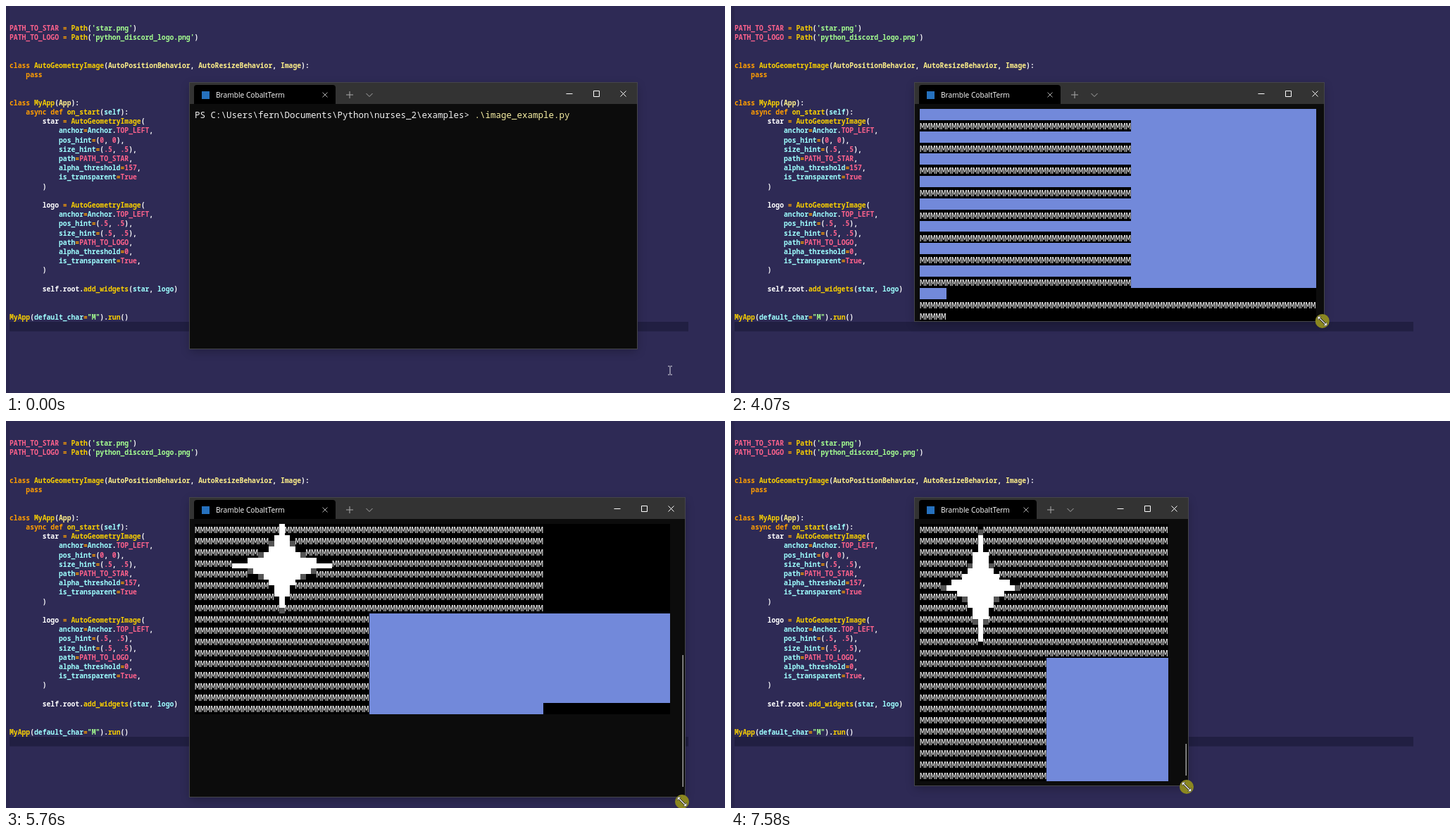
An HTML page that plays this animation: 1021x549 px, repeating every 8000 ms.

```html
<!DOCTYPE html>
<html lang="en">
<head>
<meta charset="utf-8">
<title>Terminal image demo</title>
<style>
  html, body { margin: 0; width: 100%; height: 100%; overflow: hidden; background: #2e2a55; }
  svg { display: block; width: 100vw; height: 100vh; }
  text { white-space: pre; }
  #code { font: 600 9.73px "Noto Sans Mono", monospace; fill: #fff; }
  #term, #prompt { font: 500 12.5px "Noto Sans Mono", monospace; fill: #f2f2f2; }
  #title { font: 10.2px "Open Sans", sans-serif; fill: #fff; }
  .line { fill: none; stroke: #fff; stroke-width: 1; }
  .dim { stroke: #aaa; }
</style>
</head>
<body>
<svg viewBox="0 0 1021 549" preserveAspectRatio="none">
  <defs>
    <filter id="blur" x="-10%" y="-10%" width="120%" height="120%"><feGaussianBlur stdDeviation="7"/></filter>
  </defs>
  <rect width="1021" height="549" fill="#2e2a55"/>
  <rect width="5" height="549" fill="#2a274e"/>
  <rect x="5" y="448" width="964" height="13.5" fill="#211f42"/>
  <g id="code"></g>

  <rect id="shadow" x="261" y="113" fill="#000" opacity=".25" filter="url(#blur)"/>
  <rect id="frame" x="260.5" y="108.5" fill="#0c0c0c" stroke="#45454a"/>
  <rect id="bar" x="261" y="109" height="30" fill="#333"/>
  <path id="tab"/>
  <rect x="278" y="121" width="11" height="11" fill="#2671be"/>
  <text id="title" x="298" y="130">Bramble CobaltTerm</text>
  <g id="tabTools" class="line dim">
    <path d="M-18.5 122.5l7 7m0-7l-7 7M15 126h10m-5-5v10M43.500 124l4.500 4.500l4.500-4.500"/>
  </g>
  <path id="buttons" class="line" d="M-100.500 124.500h9M-61.500 120.500h8v8h-8zM-23.500 120.500l8 8m0-8l-8 8"/>
  <text id="prompt" x="268" y="159" fill="#ccc">PS C:\Users\fern\Documents\Python\nurses_2\examples&gt; <tspan fill="#f9f1a5">.\image_example.py</tspan></text>
  <rect id="caret" x="268" y="147" width="1" height="15" fill="#fff"/>
  <g id="term"></g>
  <rect id="thumb" width="1.500" fill="#9f9f9f"/>

  <g id="mouse">
    <circle id="press" r="10" fill="#8b8720"/>
    <path id="beam" class="line" stroke-opacity=".85" d="M-3-6h2.500M.5-6h2.500M0-5.500v11M-3 6h2.500M.5 6h2.500"/>
    <g id="resize">
      <path d="M-5-5L5 5" stroke="#222" stroke-width="3"/>
      <path d="M-5-5L5 5" stroke="#fff" stroke-width="1.300"/>
      <path d="M-6.500-6.500h5l-5 5zM6.500 6.500h-5l5-5z" fill="#fff" stroke="#222" stroke-width=".5"/>
    </g>
  </g>
</svg>
<script>
const LOOP = 8000, LEFT = 268, TOP = 146, CW = 7.5, CH = 15.86;
const BLUE = '#7289da', BLACK = '#000';
const $ = id => document.getElementById(id);
const set = (id, attrs) => { for (const k in attrs) $(id).setAttribute(k, attrs[k]); };
const show = (id, on) => set(id, { visibility: on ? 'visible' : 'hidden' });
const lerp = (a, b, p) => a + (b - a) * p;

// ---- editor ----
const source = `PATH_TO_STAR = Path('star.png')
PATH_TO_LOGO = Path('python_discord_logo.png')


class AutoGeometryImage(AutoPositionBehavior, AutoResizeBehavior, Image):
    pass


class MyApp(App):
    async def on_start(self):
        star = AutoGeometryImage(
            anchor=Anchor.TOP_LEFT,
            pos_hint=(0, 0),
            size_hint=(.5, .5),
            path=PATH_TO_STAR,
            alpha_threshold=157,
            is_transparent=True
        )

        logo = AutoGeometryImage(
            anchor=Anchor.TOP_LEFT,
            pos_hint=(.5, .5),
            size_hint=(.5, .5),
            path=PATH_TO_LOGO,
            alpha_threshold=0,
            is_transparent=True,
        )

        self.root.add_widgets(star, logo)


MyApp(default_char="M").run()`;

const tokens = [
  ['#a5ff90', /'[^']*'|"[^"]*"/],
  ['#ff9d00', /\b(?:class|pass|async|def)\b|=/],
  ['#ff628c', /\b[A-Z]+_[A-Z_]+\b|\bTrue\b|\.?\b\d+/],
  ['#fad000', /\w+(?=\()/],
  ['#9effff', /\w+(?==)|\bAnchor\b|self(?=\))|star(?=,)|logo(?=\))/],
  ['#fff08a', /\bAuto\w+|\bImage\b|\bApp\b/]
];
const lexer = new RegExp(tokens.map(([, re]) => `(${re.source})`).join('|'), 'g');
const paint = (word, ...groups) => {
  const kind = tokens.findIndex((_, i) => groups[i] !== undefined);
  return `<tspan fill="${tokens[kind][0]}">${word}</tspan>`;
};
$('code').innerHTML = source.split('\n').map((line, i) =>
  `<text x="5" y="${(35 + i * 13.21).toFixed(2)}">${line.replace(lexer, paint)}</text>`).join('');

// ---- terminal contents: a cell is 'M' or a [top, bottom] pair of colours ----
const blank = [BLACK, BLACK], solid = [BLUE, BLUE];

// half of n, ties going to the even number
const half = n => { const h = n >> 1; return n % 2 && h % 2 ? h + 1 : h; };

// colour of one star pixel in a w by h picture, or null outside
function starPixel(x, y, w, h) {
  const cx = Math.floor(.51 * w - .4) + .5, cy = .3 * h + 4;
  const dx = Math.max(0, Math.abs(x + .5 - cx) - .5) / (.267 * w);
  const dy = Math.max(0, Math.abs(y + .5 - cy) - .5) / (cy - 2.2);
  const v = dx ** .55 + dy ** .55;
  return v < 1 ? '#fff' : v < 1.04 ? '#555' : null;
}

function screen(cols, rows) {
  const w = half(cols), h = half(rows);
  const cell = (c, r) => {
    if (c >= w && c < 2 * w && r >= h && r < 2 * h) return solid;
    if (c >= w || r >= h) return 'M';
    const a = starPixel(c, 2 * r, w, 2 * h), b = starPixel(c, 2 * r + 1, w, 2 * h);
    return a || b ? [a || BLACK, b || BLACK] : 'M';
  };
  return Array.from({ length: rows }, (_, r) => Array.from({ length: cols }, (_, c) => cell(c, r)));
}

// reflow lines to a new width; the last colour runs on to the right edge
function reflow(lines, cols, rows) {
  return lines.flatMap((line, i) => {
    if (!line.length) return [line];
    const last = line.length - 1, out = [];
    const fill = line[last] === solid && lines[i + 1]?.[last] === solid ? solid : blank;
    for (let c = 0; c < line.length; c += cols) {
      const part = line.slice(c, c + cols);
      while (part.length < cols) part.push(fill);
      out.push(part);
    }
    return out;
  }).slice(-rows);
}

function drawLine(line, r) {
  let svg = '';
  for (let k = 0; k < 2; k++) {
    const y = Math.round(TOP + (r + k / 2) * CH), bottom = Math.round(TOP + (r + (k + 1) / 2) * CH);
    const color = c => line[c] === 'M' ? BLACK : line[c][k];
    for (let c = 0, from = 0; c < line.length; c++) {
      if (c + 1 < line.length && color(c + 1) === color(from)) continue;
      svg += `<rect x="${LEFT + from * CW}" y="${y}" width="${(c + 1 - from) * CW}" height="${bottom - y}" fill="${color(from)}"/>`;
      from = c + 1;
    }
  }
  const chars = line.map(cell => cell === 'M' ? 'M' : ' ').join('');
  return `<g shape-rendering="crispEdges">${svg}</g><text x="${LEFT}" y="${(TOP + r * CH + 13).toFixed(1)}">${chars}</text>`;
}

let drawn = '';
function drawTerm(key, build) {
  if (key === drawn) return;
  drawn = key;
  $('term').innerHTML = build().map(drawLine).join('');
}

// ---- timeline ----
// share done of a move made in n equal steps, the first one at time a
const steps = (t, a, b, n) =>
  t < a ? 0 : Math.min(1, (Math.floor((t - a) / (b - a) * (n - 1) + 1e-6) + 1) / n);
const out = (p, e) => 1 - (1 - p) ** e;
const inOut = p => (1 - Math.cos(Math.PI * p)) / 2;

function windowAt(t) {
  if (t < 5480) {
    const p = steps(t, 3860, 4600, 12), x = out(p, 1.77), y = out(p, 4);
    return {
      right: lerp(896, 791, x), bottom: lerp(486, 438, y),
      cols: lerp(80, 66, out(p, 1.14)), rows: lerp(21, 18, y),
      mx: lerp(896, 786, x), my: lerp(487, 437, y),
      lag: p > 0 && p < 1 ? 7 : 0, thumb: 343
    };
  }
  if (t < 6700) {
    const p = inOut(steps(t, 5480, 5760, 5));
    return {
      right: lerp(791, 964, p), bottom: lerp(438, 533, p), cols: lerp(66, 90, p), rows: lerp(18, 24, p),
      mx: lerp(786, 960, p), my: lerp(437, 540, p), lag: 0, thumb: t < 6040 ? lerp(343, 332, p) : 419
    };
  }
  const p = inOut(steps(t, 6700, 7100, 7));
  return {
    right: lerp(964, 649, p), bottom: lerp(533, 517, p), cols: lerp(91, 47, p), rows: lerp(24, 23, p),
    mx: lerp(957, 647, p), my: lerp(536, 519, p), lag: 0, thumb: lerp(419, 458, p)
  };
}

function drawContents(t, cols, rows) {
  const key = name => `${name} ${cols} ${rows}`;
  if (t < 2060) drawTerm('empty', () => []);
  else if (t < 3860) drawTerm('start', () => screen(80, 21));
  else if (t < 4600) drawTerm(key('narrow'), () => reflow(screen(80, 21), cols, rows));
  else if (t < 5480) drawTerm('small', () => screen(66, 18));
  else if (t < 6040) drawTerm(key('widen'), () => reflow(screen(66, 18).slice(1), cols, rows));
  else if (t < 6700) drawTerm('large', () => screen(90, 24));
  else if (t < 7510) drawTerm(key('torn'), () => reflow(screen(89, 24).flatMap(l => [l, []]), cols, rows));
  else drawTerm('tall', () => screen(47, 23));
}

function drawMouse(t, win) {
  let x = win.mx, y = win.my;
  const back = steps(t, 2540, 3310, 12);
  if (t < 930) {
    const p = inOut(steps(t, 70, 860, 11));
    x = lerp(943, 761, p);
    y = lerp(517, 388, p);
  } else if (t < 3310) {
    const p = inOut(back);
    x = lerp(769, 896, p);
    y = lerp(386, 487, p);
  }
  const visible = t < 1190 || t >= 2540, arrow = back > .9;
  set('mouse', { transform: `translate(${x.toFixed(1)} ${y.toFixed(1)})` });
  show('beam', visible && !arrow);
  show('resize', visible && arrow);
  show('press', t >= 3860);
}

function render(t) {
  const win = windowAt(t), right = Math.round(win.right), bottom = Math.round(win.bottom);
  const width = right - 261, tab = Math.min(468, right - 215);
  set('shadow', { width, height: bottom - 109 });
  set('frame', { width: width + 1, height: bottom - 108 });
  set('bar', { width });
  set('tab', { d: `M267 139V116q0-4 4-4H${tab - 4}q4 0 4 4V139z` });
  set('tabTools', { transform: `translate(${tab} 0)` });
  set('buttons', { transform: `translate(${right + win.lag} 0)` });

  show('prompt', t < 1260);
  show('caret', t >= 1990 && t < 2060);
  drawContents(t, Math.round(win.cols), Math.round(win.rows));
  set('thumb', {
    x: right - 3.5, y: win.thumb, height: Math.max(0, bottom - 14 - win.thumb),
    opacity: steps(t, 5150, 5280, 2)
  });
  drawMouse(t, win);
}

const start = performance.now();
function tick() {
  render((performance.now() - start) % LOOP);
  requestAnimationFrame(tick);
}
tick();
</script>
</body>
</html>
```
